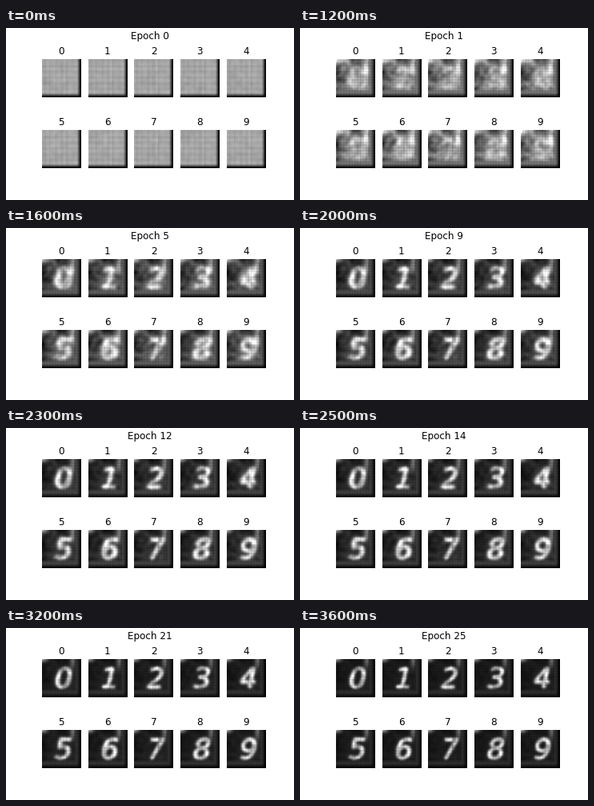
A matplotlib script that plays this animation: 360x216 px, repeating every 4700 ms.

```python
import numpy as np
import matplotlib.pyplot as plt
from matplotlib.animation import FuncAnimation
from matplotlib.path import Path
from matplotlib.textpath import TextPath
from matplotlib.transforms import Affine2D

N, SUB = 28, 4
HOLD, LAST, FRAMES, STEP = 12, 25, 47, 100

plt.rcParams["font.family"] = "DejaVu Sans"
rng = np.random.default_rng(7)
idx = np.arange(N)
X, Y = np.meshgrid(idx, idx)


def blur(field, s):
    k = np.exp(-((idx[:, None] - idx) ** 2) / (2 * s * s))
    k /= k.sum(axis=1, keepdims=True)
    return k @ field @ k.T


def blotches(s):
    field = blur(rng.normal(size=(N, N)), s)
    return field / field.std()


def blob(cx, cy, rx, ry, p=2):
    return np.exp(-np.abs((X - cx) / rx) ** p - np.abs((Y - cy) / ry) ** p)


def fall(v, at, soft):
    """Smooth step from 1 down to 0 around v = at."""
    return 1 / (1 + np.exp((v - at) / soft))


def glyph(d):
    """Ink coverage per cell of a slanted digit."""
    path = TextPath((0, 0), str(d), size=20)
    box = path.get_extents()
    place = (Affine2D().translate(-(box.x0 + box.x1) / 2, -(box.y0 + box.y1) / 2)
             .skew(0.2, 0).scale(1, -1).translate(15, 13.5))
    fine = (np.arange(N * SUB) + 0.5) / SUB - 0.5
    points = np.stack(np.meshgrid(fine, fine), axis=-1).reshape(-1, 2)
    loops = place.transform_path(path).to_polygons()
    inside = np.logical_xor.reduce([Path(p).contains_points(points) for p in loops])
    return inside.reshape(N, SUB, N, SUB).mean(axis=(1, 3))


def plaid(fine, coarse):
    """Stripes left by strided upsampling."""
    rows, cols = (fine * np.cos(np.pi * idx) + coarse * np.cos(np.pi * idx / 2 + 0.8)
                  + rng.normal(0, 0.015, N) for _ in range(2))
    return 1 + rows[:, None] + cols


weave, grid = plaid(0.008, 0.03), plaid(0.05, 0.015)
fade = np.clip((N - 1 - idx) / 2.2, 0, 1)
edge = np.outer(fade, fade)
band = 1 - fall(np.maximum(X - 1, Y), 22.3, 0.4)
shared = blotches(1.3)
own = [blotches(1.1) for _ in range(10)]
glyphs = [glyph(d) for d in range(10)]


def picture(d, epoch):
    if epoch == 0:
        return np.clip((0.65 * weave + 0.012 * own[d]) * edge, 0, 1)
    slow = np.exp(-(epoch - 1) / 12)
    fast = np.exp(-(epoch - 1) / 4)

    # Backdrop: centre glow, bright corner and a strip at the upper right
    img = 0.07 + 0.14 * slow + 0.18 * fast
    img = img + 0.24 * slow * blob(15, 14, 8, 10, 4)
    img += 0.55 * blob(0, 0, 3.5 + 4 * fast, 2 + fast)
    img += 0.35 * blob(21.5, 0, 1.8, 20) * fall(Y, 4 + 9 * slow, 1.5)
    img += slow * (0.07 * shared + 0.04 * own[d])

    # Digit: starts wide and soft, ends thin and uneven
    ink = np.tanh((1.5 + slow) * blur(glyphs[d], 0.6 + 1.2 * slow))
    img += (0.85 - 0.65 * fast) * ink * (1 + 0.17 * own[d])

    img += band * (0.13 + 0.3 * slow - img)
    return np.clip(img * grid * edge, 0, 1)


fig, axes = plt.subplots(2, 5, figsize=(5, 3), dpi=72)
fig.subplots_adjust(left=0.125, right=0.9, bottom=0.125, top=0.88,
                    wspace=0.2, hspace=0.2)
heading = fig.suptitle("Epoch 0", fontsize=12)
images = []
for d, ax in enumerate(axes.flat):
    images.append(ax.imshow(picture(d, 0), cmap="gray", vmin=0, vmax=1))
    ax.set_title(str(d), fontsize=12)
    ax.axis("off")


def update(i):
    epoch = min(max(i - HOLD + 1, 0), LAST)
    heading.set_text(f"Epoch {epoch}")
    for d, im in enumerate(images):
        im.set_data(picture(d, epoch))
    return [heading, *images]


anim = FuncAnimation(fig, update, frames=FRAMES, interval=STEP,
                     repeat=True, repeat_delay=0, blit=False)
plt.show()
```
